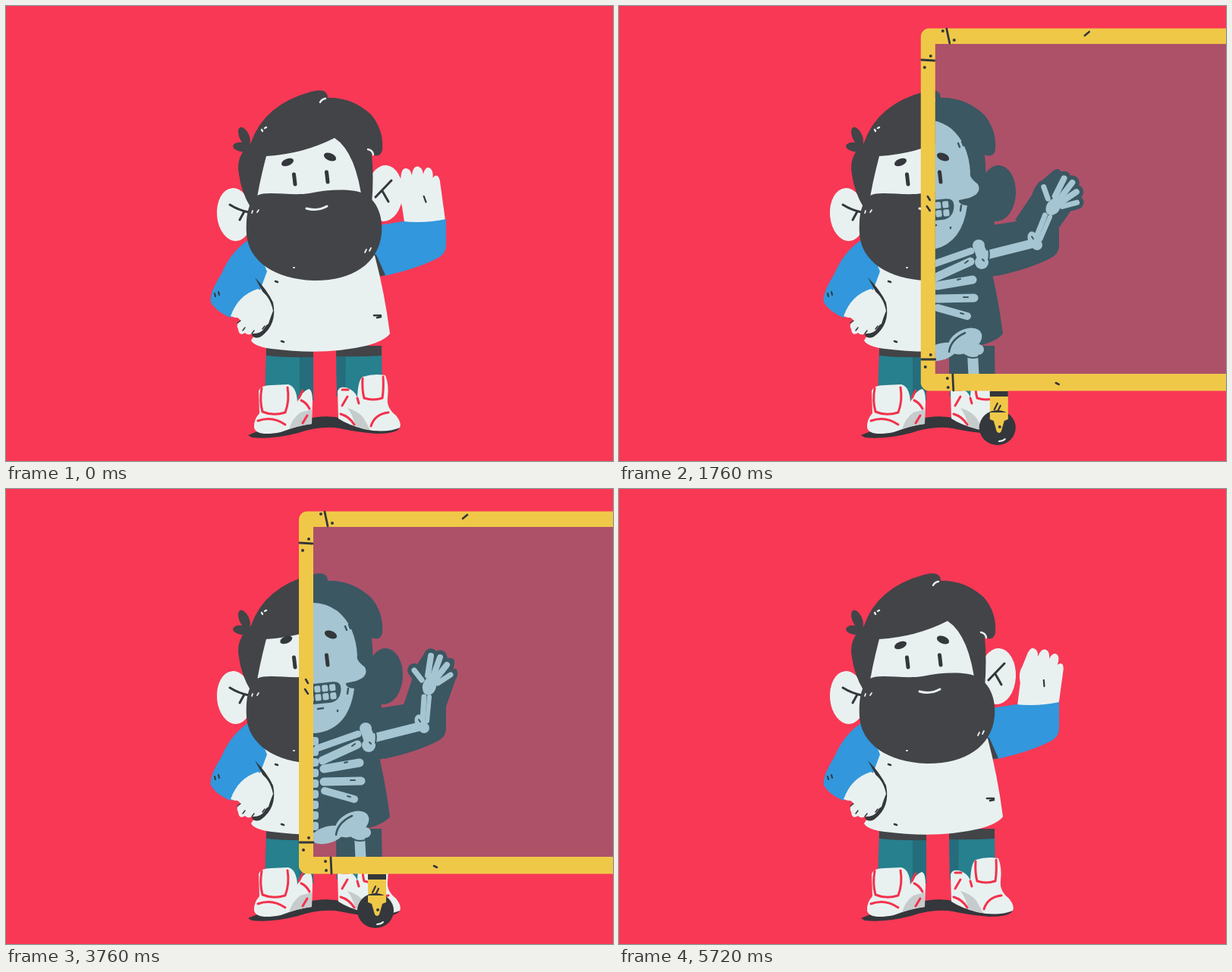
Write an HTML page with a canvas that moves like this. It is 800 by 600 pixels and loops after 5760 ms.

```html
<!DOCTYPE html>
<html lang="en">
<head>
<meta charset="utf-8">
<title>X-ray wave</title>
<style>
  html, body { margin: 0; width: 100%; height: 100%; overflow: hidden; background: #f83855; }
  canvas { display: block; width: 800px; height: 600px; }
</style>
</head>
<body>
<canvas id="stage" width="800" height="600"></canvas>
<script>
const ctx = document.getElementById('stage').getContext('2d');
const LOOP = 5760, FRAME = 40;
const RED = '#f83855', WHITE = '#e9f1f0', DARK = '#424448', BLUE = '#3297dc';
const TEAL = '#26808e', DEEP = '#256d7c', GREY = '#c6cbcc', LINE = '#f2324c';
const YELLOW = '#f0c848', INK = '#34373b', GLASS = '#ad5169', SHADE = '#3b5762', BONE = '#a5c5d2';

let mono = null;   // when set, every shape is filled with this colour

const cache = {};
const path = d => cache[d] || (cache[d] = new Path2D(d));

function fill(d, color) {
  ctx.fillStyle = mono || color;
  ctx.fill(path(d));
}
function line(d, color, w) {
  if (mono) return;
  ctx.strokeStyle = color;
  ctx.lineWidth = w;
  ctx.stroke(path(d));
}
function oval(x, y, rx, ry, deg, color) {
  ctx.fillStyle = mono || color;
  ctx.beginPath();
  ctx.ellipse(x, y, rx, ry, deg * Math.PI / 180, 0, Math.PI * 2);
  ctx.fill();
}
function turned(x, y, deg, draw) {
  ctx.save();
  ctx.translate(x, y);
  ctx.rotate(deg * Math.PI / 180);
  ctx.translate(-x, -y);
  draw();
  ctx.restore();
}

// ---- motion ----

const clamp = v => Math.max(0, Math.min(1, v));
const smooth = v => { v = clamp(v); return v * v * (3 - 2 * v); };

function waveAngle(t) {
  const lead = FRAME * clamp(1 - t / 960);
  return 15.7 + 22 * Math.cos((t + lead - 780) / 480 * Math.PI * 2);
}
function panelX(t) {
  if (t > 3200) t = 6385 - t;        // leaves the way it came
  const start = 1140, hit = 1769, rest = 386;
  if (t < start) return 900;
  if (t < hit) {
    const u = (t - start) / (hit - start);
    return rest + 414 * (1 - u * u);
  }
  const s = t - hit;
  return rest - 85 * Math.exp(-0.008 * s) * Math.sin(0.022 * s);
}
const browLift = t => 7 * (smooth((t - 1790) / 160) - smooth((t - 4940) / 160));
function eyeOpen(t) {
  const near = Math.min(...[600, 2690, 4800].map(c => Math.abs(t - c)));
  return smooth((near - 15) / 75);
}

// ---- person ----

function legs() {
  fill('M343 448H405V520H341Z', TEAL);
  fill('M387 448H405V520H387Z', DEEP);
  fill('M435 448H495L496 515H436Z', TEAL);
  fill('M435 448H448L447 515H436Z', DEEP);
  fill('M343 448H405V463Q370 464 343 461Z', DARK);
  fill('M435 448H495V461Q465 463 435 462Z', DARK);
}
function shoes() {
  fill('M333 508Q335 500 350 500L372 499Q383 502 384 522Q390 508 399 505Q404 506 404 522L403 551Q386 553 362 562Q330 568 327 556Q326 546 334 537Z', WHITE);
  fill('M373 558Q377 544 388 536L403 532V551Q386 553 373 558Z', GREY);
  line('M337 504Q334 520 338 535Q352 541 368 536Q374 520 371 503', LINE, 3);
  line('M332 547Q351 540 368 552M391 507L386 517M389 520Q396 523 400 531M391 550L397 540', LINE, 3);

  fill('M463 516Q464 493 470 489Q485 484 500 487Q505 500 503 516Q501 530 514 540Q522 550 519 556Q500 564 472 558Q450 552 438 544L437 508Q440 500 451 504Q460 508 463 516Z', WHITE);
  fill('M450 530Q464 534 471 543L480 559Q468 558 460 553Q458 541 450 530Z', GREY);
  line('M470 491Q469 506 472 517Q484 521 496 517Q498 504 497 489', LINE, 3);
  line('M443 527L450 515M443 506L451 506M463 517L465 524M441 538Q452 541 459 552M481 554Q486 538 504 536', LINE, 3);
}
function hand(angle) {
  turned(551, 285, angle, () => {
    fill('M526 300L524 260Q519 248 523 238L526 224Q528 211 534 212Q540 213 541 222Q543 210 550 211Q556 213 556 222Q560 211 566 215Q570 219 568 228Q575 221 577 232L579 283L574 300Z', WHITE);
    line('M554 251L556 259', INK, 2.2);
  });
}
function arms(angle) {
  oval(499, 247, 24, 37, 3, WHITE);
  line('M508 230L487 252M496 244L504 258', INK, 3);
  hand(angle);
  fill('M485 290Q505 287 523 284Q552 287 580 281V316Q580 327 568 333Q540 347 498 356L480 330Z', BLUE);
}
function body() {
  fill('M482 327L488 328L500 355L490 357Z', DARK);
  fill('M340 340Q333 375 331 415Q329 434 323 441Q327 449 350 452Q420 461 475 448Q500 441 506 432Q499 378 486 329Q430 300 340 340Z', WHITE);
  line('M355 363L358 364M363 442L366 443M485 408L494 408M489 411L494 410', INK, 2.6);
}
function restArm() {
  fill('M320 308Q296 324 284 353Q267 380 270 391Q277 403 296 411Q315 395 334 377L344 350Q335 325 320 308Z', BLUE);
  line('M275 379L276 383M280 377L281 381', INK, 2);
  fill('M328 358Q344 374 352 391Q358 420 336 436Q328 440 324 434L347 405L340 380Z', INK);
  fill('M296 409Q306 381 332 373Q348 381 352 402Q348 412 346 419Q343 420 341 424Q336 433 324 432Q319 435 315 431Q307 436 306 426Q302 420 309 415Q306 410 302 411Z', WHITE);
  line('M309 415L305 418M315 424L312 428M327 428L324 432M338 426L341 422', INK, 1.5);
}
function browsAndEyes(lift, open) {
  oval(371 - lift / 4, 206 - lift, 8.5, 4.5, -22, INK);
  oval(427 + lift / 7, 199 - lift, 8.5, 4.8, 22, INK);
  ctx.strokeStyle = INK;
  ctx.lineWidth = 2.5 + 2.5 * open;
  for (const [x, y] of [[380, 222], [423, 219]]) {
    ctx.beginPath();
    ctx.moveTo(x - .5 + (1 - open), y + 13 - 13 * open);
    ctx.lineTo(x + 1, y + 13);
    ctx.stroke();
  }
}
function head(lift, open) {
  oval(301, 275, 23, 35, -5, WHITE);
  line('M295 262Q306 269 320 272M314 271L308 282', INK, 3);
  fill('M322 265Q310 245 307 222Q302 198 323 180Q340 130 402 113Q424 107 424 121Q456 120 481 143Q498 163 496 190Q493 201 482 196Q485 225 482 262Z', DARK);
  oval(314, 172, 6.5, 13, -24, DARK);
  oval(310, 186, 11, 6, 8, DARK);
  fill('M329 265Q333 236 343 198Q392 195 433 174Q462 193 470 262Z', WHITE);
  line('M414 127Q416 123 421 122M337 163L338 165M341 161L343 160M477 189Q483 190 484 196', WHITE, 2.4);
  if (!mono) browsAndEyes(lift, open);
  fill('M331 250C344 243 375 251 400 247C430 241 458 241 473 248C489 257 497 277 495 300C491 341 454 363 405 362C355 360 319 337 317 300C316 275 319 260 331 250Z', DARK);
  line('M396 267Q411 271 423 264', WHITE, 3);
  line('M325 270L324 273M333 269L331 272M475 321L473 325M481 319L479 323M379 345L380 345', WHITE, 1.8);
}
function person(t) {
  const angle = waveAngle(t);
  legs();
  shoes();
  arms(angle);
  body();
  restArm();
  head(browLift(t), eyeOpen(t));
}

// ---- x-ray ----

function bone(x1, y1, x2, y2, w, color = BONE) {
  ctx.strokeStyle = color;
  ctx.lineWidth = w;
  ctx.beginPath();
  ctx.moveTo(x1, y1);
  ctx.lineTo(x2, y2);
  ctx.stroke();
}
function handBones(grow, color) {
  bone(549, 304, 551, 274, 7 + grow, color);
  bone(555, 306, 558, 274, 6 + grow, color);
  bone(548, 252, 538, 239, 7 + grow, color);
  bone(556, 246, 560, 220, 8 + grow, color);
  bone(563, 247, 572, 222, 8 + grow, color);
  bone(566, 251, 581, 232, 8 + grow, color);
  bone(569, 256, 586, 245, 7 + grow, color);
  oval(558, 260, 9 + grow / 2, 12 + grow / 2, 15, color);
}
function ribSide() {
  bone(410, 342, 464, 323, 9);
  bone(417, 358, 463, 337, 11);
  bone(419, 369, 466, 361, 11);
  bone(419, 386, 468, 385, 11);
  bone(420, 398, 459, 409, 10);
  oval(424, 456, 22, 11, -16, BONE);
  oval(456, 442, 24, 15, -28, BONE);
  line('M435 456Q437 440 456 431', SHADE, 2.5);
  bone(460, 454, 474, 453, 14);
  bone(466, 458, 468, 496, 14);
  line('M458 462Q466 466 476 462M456 339L460 336M446 361L450 360M454 384L460 384M450 405L454 406', SHADE, 2);
}
function skull(t) {
  fill('M405 150Q346 151 343 198L338 255Q346 318 408 322Q452 317 459 263Q447 262 448 256L462 253Q479 247 473 235Q461 226 463 220Q461 181 437 161Q421 150 405 150Z', BONE);
  line('M447 181L449 186M452 179L454 184M451 263L450 270M411 290L418 289M437 292L437 293', SHADE, 2.4);
  browsAndEyes(browLift(t), eyeOpen(t));
  turned(405, 270, -6, () => {
    fill('M380 257H432Q443 257 442 267Q440 284 424 284H386Q370 282 370 268Q370 257 380 257Z', SHADE);
    for (let i = 0; i < 6; i++) {
      for (let row = 0; row < 2; row++) {
        ctx.fillStyle = BONE;
        ctx.beginPath();
        ctx.roundRect(377 + i * 10, 260 + row * 11, 8, 9, 2);
        ctx.fill();
      }
    }
  });
}
function skeleton(t) {
  const turn = (waveAngle(t) - 21.4) * 1.15;
  mono = SHADE;
  person(t);
  mono = null;
  turned(550, 308, turn, () => handBones(11, SHADE));

  for (let y = 327; y < 466; y += 14) {
    ctx.fillStyle = BONE;
    ctx.beginPath();
    ctx.roundRect(393, y, 19, 11, 4);
    ctx.fill();
  }
  ribSide();
  ctx.save();
  ctx.translate(806, 0);
  ctx.scale(-1, 1);
  ribSide();
  ctx.restore();

  turned(550, 308, turn, () => handBones(0, BONE));
  bone(482, 329, 546, 313, 17, SHADE);
  bone(482, 329, 546, 313, 12);
  oval(474, 316, 8, 8, 0, BONE);
  oval(478, 338, 9, 9, 0, BONE);
  bone(476, 322, 480, 334, 15);
  oval(546, 308, 7, 11, -20, BONE);
  oval(551, 315, 7, 7, 0, BONE);
  line('M486 319Q489 325 487 335M544 304L546 307M479 334L481 336', SHADE, 2);
  skull(t);
}

// ---- panel ----

function frameMarks() {
  line('M34 30L38 49M1 71L18 72M1 466L19 466M42 486L43 507', INK, 2.8);
  line('M216 39L222 34M9 251L12 256M8 264L12 270M178 497L182 499', INK, 2.6);
  for (const [x, y] of [[29, 33], [44, 45], [13, 66], [5, 81], [13, 460], [6, 476], [35, 491], [36, 503]])
    oval(x, y, 2, 2, 0, INK);
}
function wheel() {
  fill('M91 500H115V546H91Z', YELLOW);
  fill('M91 508H115V515H91Z', INK);
  line('M97 532L101 524M102 533L105 527', INK, 2.2);
  oval(101, 556, 24, 23, 0, INK);
  fill('M91 536H115V545L110 547L106 561Q103 565 100 561L96 547L91 545Z', YELLOW);
  oval(104, 555, 2, 2, 0, INK);
  line('M103 574Q108 574 111 571', WHITE, 2);
}
function panel(t) {
  const x = panelX(t);
  if (x > 805) return;
  ctx.save();
  ctx.beginPath();
  ctx.rect(x + 19, 50, 800, 435);
  ctx.clip();
  ctx.fillStyle = GLASS;
  ctx.fillRect(x, 40, 820, 460);
  skeleton(t);
  ctx.restore();

  ctx.save();
  ctx.translate(x, 0);
  wheel();
  ctx.fillStyle = YELLOW;
  ctx.beginPath();
  ctx.roundRect(0, 29.5, 900, 478, 11);
  ctx.rect(19, 50, 860, 435);
  ctx.fill('evenodd');
  frameMarks();
  ctx.restore();
}

function draw(t) {
  ctx.lineCap = ctx.lineJoin = 'round';
  ctx.fillStyle = RED;
  ctx.fillRect(0, 0, 800, 600);
  fill('M319 566Q340 556 395 545Q420 538 445 544L519 555Q517 564 488 564Q462 562 440 557Q415 553 385 563Q350 572 324 569Z', INK);
  person(t);
  panel(t);
}

const began = performance.now();
function tick(now) {
  const t = Math.max(0, now - began) % LOOP;
  draw(Math.floor(t / FRAME) * FRAME);
  requestAnimationFrame(tick);
}
draw(0);
requestAnimationFrame(tick);
</script>
</body>
</html>
```
